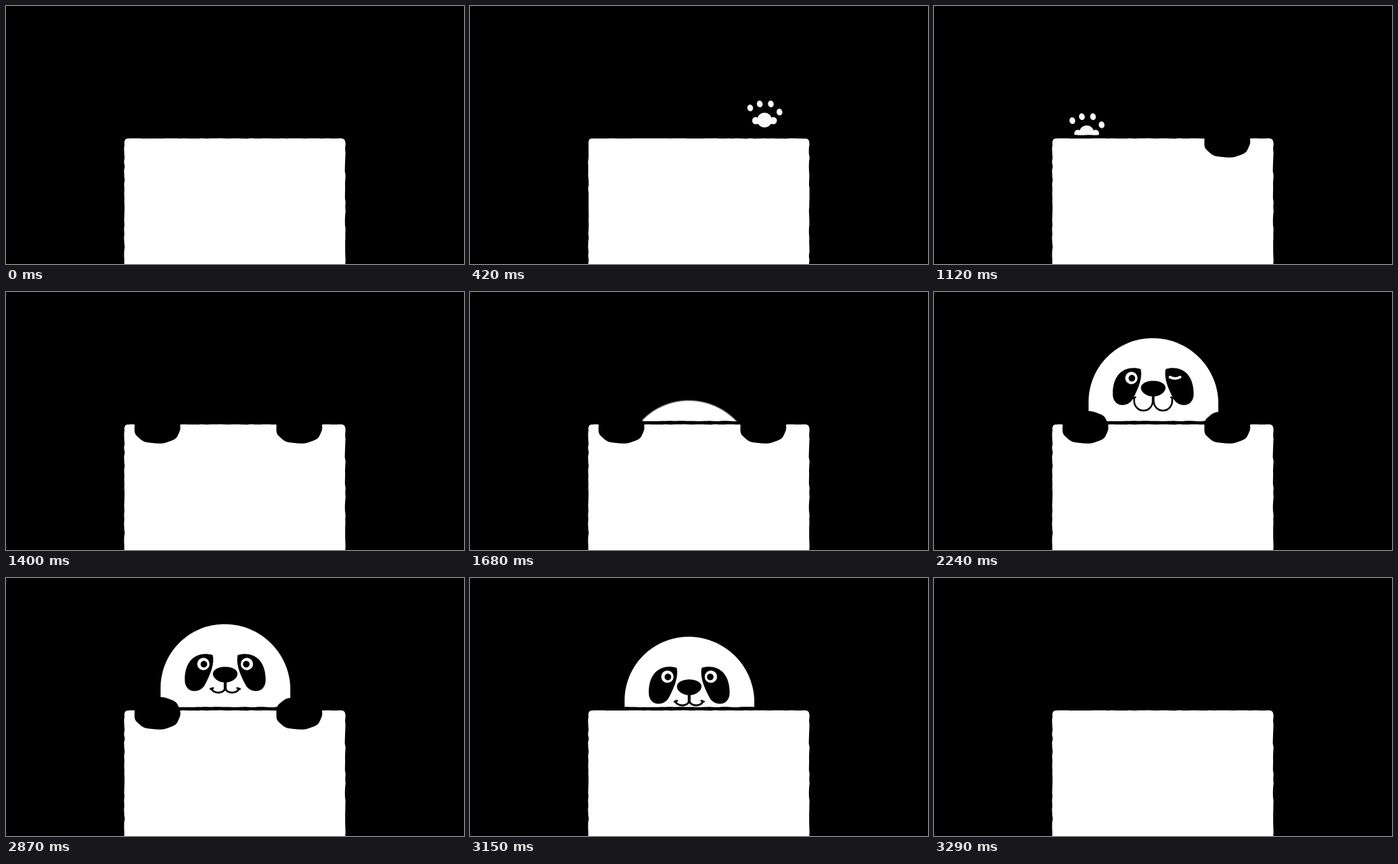
An HTML page with a canvas for the animation above (5670 ms loop, 720 by 405 pixels).

```html
<!DOCTYPE html>
<html lang="en">
<head>
<meta charset="utf-8">
<title>Peeking panda</title>
<style>
  html, body { margin: 0; width: 100%; height: 100%; overflow: hidden; background: #000; }
  canvas { display: block; width: 720px; height: 405px; }
</style>
</head>
<body>
<canvas id="stage" width="720" height="405"></canvas>
<script>
const ctx = document.getElementById('stage').getContext('2d');
const LOOP = 5670, STEP = 70;
const BLACK = '#000', WHITE = '#fff', PAD = '#fafafa';
const PAW_GAP = 223;              // from the left paw to the right one
const HEAD = { x: 345, top: 72, r: 102 };
const FACE_X = 344.6;             // mirror axis of the face

function fill(color) {
  ctx.fillStyle = color;
  ctx.fill();
}

function stroke(color, width) {
  ctx.strokeStyle = color;
  ctx.lineWidth = width;
  ctx.stroke();
}

function oval(x, y, rx, ry, color, turn = 0) {
  ctx.beginPath();
  ctx.ellipse(x, y, rx, ry, turn, 0, Math.PI * 2);
  fill(color);
}

// Closed curve through point(angle)
function loopShape(point, color) {
  ctx.beginPath();
  for (let a = 0; a < Math.PI * 2; a += 0.04) ctx.lineTo(...point(a));
  ctx.closePath();
  fill(color);
}

function shifted(dx, dy, draw) {
  ctx.save();
  ctx.translate(dx, dy);
  draw();
  ctx.restore();
}

// Draws once as is and once flipped about the face axis.
function mirrored(draw) {
  draw();
  ctx.save();
  ctx.translate(2 * FACE_X, 0);
  ctx.scale(-1, 1);
  draw();
  ctx.restore();
}

// Smooth seeded noise in -1..1 for hand-cut edges
function noise(s, seed) {
  const hash = n => {
    const v = Math.sin(n * 127.1 + seed * 311.7) * 43758.5453;
    return 2 * (v - Math.floor(v)) - 1;
  };
  const i = Math.floor(s / 7), f = s / 7 - i, k = f * f * (3 - 2 * f);
  return hash(i) * (1 - k) + hash(i + 1) * k;
}

function sheet(seed) {
  const l = 186.1, r = 533.2, top = 207.9, corner = 5;
  ctx.beginPath();
  for (let y = 410; y > top + corner; y -= 2) ctx.lineTo(l + 0.6 * noise(y, seed), y);
  ctx.quadraticCurveTo(l + 0.5, top, l + corner, top);
  for (let x = l + corner; x < r - corner; x += 2) ctx.lineTo(x, top + 0.3 * noise(x, seed + 1));
  ctx.quadraticCurveTo(r - 0.5, top, r, top + corner);
  for (let y = top + corner; y < 412; y += 2) ctx.lineTo(r + 0.6 * noise(y, seed + 2), y);
  fill(WHITE);
}

function openPaw() {
  for (const [x, y] of [[217.5, 180], [232.5, 173.8], [250, 173.8], [263.5, 186.5]]) {
    oval(x, y, 4.5, 5.3, PAD, -0.2);
  }
  oval(240, 199, 11.5, 11.5, PAD);
  oval(240, 201, 17, 5.5, PAD);
  for (const x of [226, 254]) oval(x, 200, 5.5, 5.8, PAD);
}

// Squarish oval with soft knuckles
function grip() {
  const round = v => Math.sign(v) * Math.abs(v) ** 0.86;
  loopShape(a => {
    const k = 1 + 0.012 * Math.sin(9 * a + 1.5);
    return [237.7 + 36 * k * round(Math.cos(a)), 212.3 + 25.3 * k * round(Math.sin(a))];
  }, BLACK);
}

function dome() {
  const { x, top, r } = HEAD, y = top + r;
  ctx.beginPath();
  ctx.moveTo(x - r, y + 70);
  for (let a = 0; a <= Math.PI; a += Math.PI / 90) {
    const s = Math.sin(a);
    ctx.lineTo(x - r * Math.cos(a) - 1.2 * s, y - (r - 0.4) * s);
  }
  ctx.lineTo(x + r, y + 70);
}

function patch() {
  ctx.beginPath();
  ctx.moveTo(325, 121);
  ctx.bezierCurveTo(305, 115, 281, 124, 281, 160);
  ctx.bezierCurveTo(281, 182, 306, 182, 313, 167);
  ctx.bezierCurveTo(322, 150, 328, 134, 325, 121);
  fill(BLACK);
}

function eye(x, look) {
  oval(x, 135, 9.7, 9.7, WHITE);
  oval(x + look, 135.3, 5.2, 5.2, BLACK);
}

function closedEye() {
  ctx.beginPath();
  ctx.moveTo(371, 133.6);
  ctx.quadraticCurveTo(379.5, 138, 387, 133.6);
  stroke(WHITE, 4);
}

function nose() {
  loopShape(a => {
    const s = Math.sin(a);
    return [FACE_X + 19.2 * Math.cos(a) * (1 - 0.1 * s), 151.7 + 12.3 * s];
  }, BLACK);
}

// Half of the mouth: a cup hanging from the centre line
function cup(rx, y, ry, stem, width) {
  const x = FACE_X - 0.7 - rx;
  ctx.beginPath();
  ctx.moveTo(x + rx, 162);
  ctx.lineTo(x + rx, y);
  ctx.ellipse(x, y, rx, ry, 0, 0, Math.PI);
  ctx.lineTo(x - rx, y - stem);
  ctx.moveTo(x - rx - 2, y - stem + 0.7);
  ctx.lineTo(x - rx + 2, y - stem - 0.7);
  stroke(BLACK, width);
}

function head(top, wink) {
  shifted(0, top - HEAD.top, () => {
    dome();
    fill(WHITE);
    if (top > 120) stroke('rgba(128,128,128,.7)', 1.8);
    mirrored(patch);
    eye(310.3, 0.8);
    if (wink) closedEye();
    else eye(378.7, -1);
    nose();
    mirrored(() => wink ? cup(14.6, 171, 15.2, 5, 2.7) : cup(10.2, 173.5, 6.5, 0, 3));
  });
}

// Head height after k of the four rising steps
function rise(k) {
  return HEAD.top + 98 * (1 - Math.min(k, 4) / 4) ** 2.3;
}

function headTop(t) {
  if (t < 1680 || t >= 3290) return null;
  if (t >= 3150) return rise(2 - 2 * Math.floor((t - 3150) / STEP));
  return rise(Math.floor((t - 1680) / STEP));
}

function draw(t) {
  const during = (from, to) => t >= from && t < to;
  const stepsSince = (from, max) => Math.min(max, Math.floor((t - from) / STEP));
  const rightOpen = during(280, 700);

  ctx.fillStyle = BLACK;
  ctx.fillRect(0, 0, 720, 405);
  ctx.lineCap = ctx.lineJoin = 'round';

  // Everything behind the sheet stops at its dark rim.
  ctx.save();
  ctx.beginPath();
  ctx.moveTo(0, 0);
  for (let x = 0; x <= 720; x += 4) ctx.lineTo(x, 202.5 + 0.4 * noise(x, 9));
  ctx.lineTo(720, 0);
  ctx.clip();
  const top = headTop(t);
  if (top !== null) head(top, during(2240, 2870));
  if (rightOpen) {
    const left = 1 - stepsSince(280, 2) / 2;
    shifted(PAW_GAP, -20 + 24 * left * left, openPaw);
  }
  if (during(1120, 1400)) shifted(0, -6 * stepsSince(1120, 1), openPaw);
  ctx.restore();

  sheet(rightOpen ? 5 : 1);

  if (during(700, 3150)) shifted(PAW_GAP, 0, grip);
  if (during(1400, 3150)) grip();
}

const start = performance.now();
function tick() {
  draw((performance.now() - start) % LOOP);
  requestAnimationFrame(tick);
}
tick();
</script>
</body>
</html>
```
